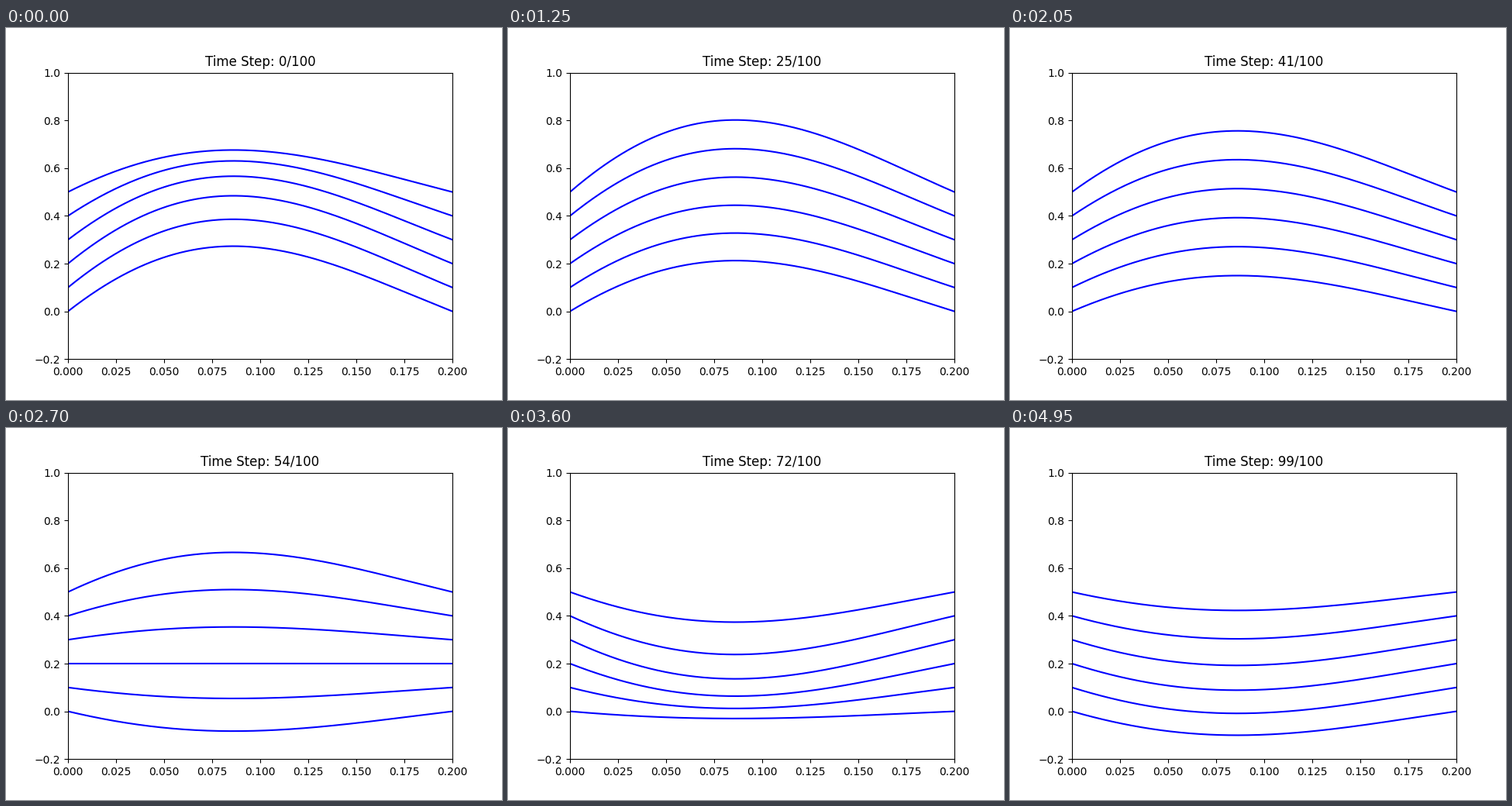
A matplotlib script for the animation above (5000 ms loop, 640 by 480 pixels).

```python
import numpy as np
import matplotlib.pyplot as plt
from matplotlib.animation import FuncAnimation

STEPS = 100
LENGTH = 0.2
LEVELS = np.linspace(0, 0.5, 6)

x = np.linspace(0, LENGTH, 200)
profile = 0.4 * np.sin(np.pi * x / LENGTH) / (1 + x / LENGTH)

plt.rcParams["font.family"] = "DejaVu Sans"
fig, ax = plt.subplots(figsize=(6.4, 4.8), dpi=100)
ax.set_xlim(0, LENGTH)
ax.set_ylim(-0.2, 1.0)
title = ax.set_title("")
lines = [ax.plot([], [], color="blue", lw=1.5)[0] for _ in LEVELS]


def amplitude(t, level):
    """Damped wave whose rate swings over the loop; higher levels lag behind."""
    s = t - 0.7 * level
    rate = np.pi * (1 - np.sin(2 * np.pi * t))
    return np.exp(-s) * np.cos(rate * s)


def update(step):
    t = step / STEPS
    for line, level in zip(lines, LEVELS):
        line.set_data(x, level + amplitude(t, level) * profile)
    title.set_text(f"Time Step: {step}/{STEPS}")
    return [*lines, title]


anim = FuncAnimation(fig, update, frames=STEPS, interval=50,
                     repeat=True, repeat_delay=0, blit=False)
plt.show()
```
